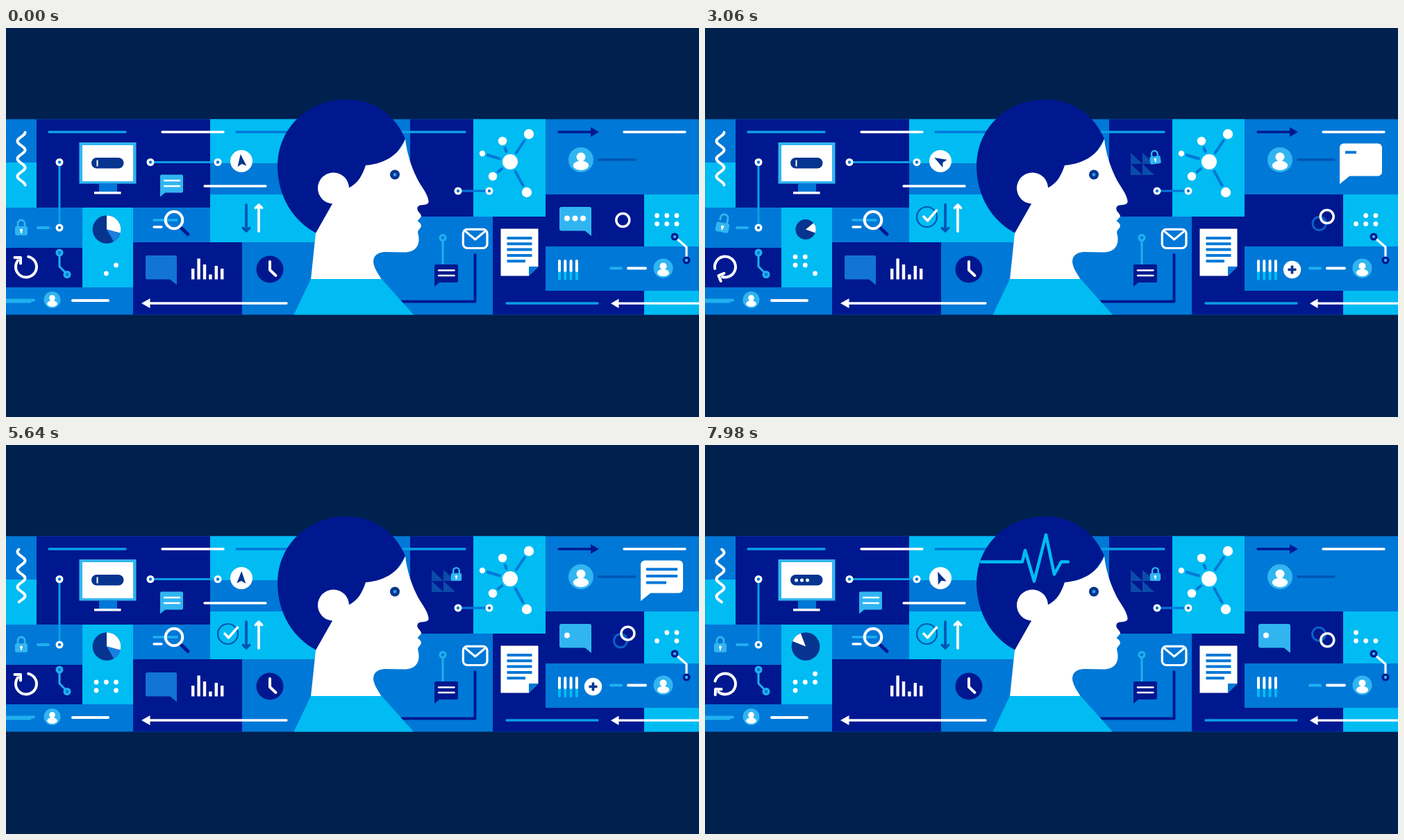
Recreate the animation shown at these times as an HTML page with a canvas. Size 998 by 561 pixels, loop 8 s.

```html
<!DOCTYPE html>
<html lang="en">
<head>
<meta charset="utf-8">
<title>Connected mind</title>
<style>
  html, body { margin: 0; width: 100%; height: 100%; overflow: hidden; background: #00204d; }
  canvas { display: block; }
</style>
</head>
<body>
<canvas id="stage" width="998" height="561"></canvas>
<script>
const ctx = document.getElementById('stage').getContext('2d');
const LOOP = 8000, CYCLE = 3600;
const NIGHT = '#00204d', NAVY = '#00188f', BLUE = '#0078d7', CYAN = '#00bcf2';
const SKY = '#31b5f1', TRACE = '#0a9fe6', AQUA = '#1fb0f0', INK = '#0055b3', DEEP = '#06348f', WHITE = '#fff';

// ---- timing ----
const clamp = u => Math.min(1, Math.max(0, u));
const smooth = u => u * u * (3 - 2 * u);
const ramp = (t, start, length) => smooth(clamp((t - start) / length));
const pulse = (t, center, half) => smooth(clamp(1 - Math.abs(t - center) / half));
const between = (t, start, end, length) => ramp(t, start, length) - ramp(t, end, length);
const noise = (...seed) => {
  const v = Math.sin(seed.reduce((sum, s, i) => sum + s * (12.9898 + i * 65.2432), 1)) * 43758.5453;
  return v - Math.floor(v);
};

// ---- drawing helpers ----
function rect(x1, y1, x2, y2, color, r = 0) {
  ctx.fillStyle = color;
  ctx.beginPath();
  ctx.roundRect(x1, y1, x2 - x1, y2 - y1, r);
  ctx.fill();
}
function dot(x, y, r, color) {
  ctx.fillStyle = color;
  ctx.beginPath();
  ctx.arc(x, y, r, 0, 7);
  ctx.fill();
}
function ring(x, y, r, color, width) {
  ctx.strokeStyle = color;
  ctx.lineWidth = width;
  ctx.beginPath();
  ctx.arc(x, y, r, 0, 7);
  ctx.stroke();
}
function outline(points) {
  ctx.beginPath();
  for (let i = 0; i < points.length; i += 2) ctx.lineTo(points[i], points[i + 1]);
}
function line(color, width, ...points) {
  ctx.strokeStyle = color;
  ctx.lineWidth = width;
  outline(points);
  ctx.stroke();
}
function poly(color, ...points) {
  ctx.fillStyle = color;
  outline(points);
  ctx.fill();
}
function fillPath(color, path) {
  ctx.fillStyle = color;
  ctx.fill(path);
}
// Draws around a pivot; the callback uses stage coordinates.
function posed(x, y, scale, degrees, draw) {
  if (scale <= 0.01) return;
  ctx.save();
  ctx.translate(x, y);
  ctx.rotate(degrees * Math.PI / 180);
  ctx.scale(scale, scale);
  ctx.translate(-x, -y);
  draw();
  ctx.restore();
}
function node(x, y, outer = WHITE, inner = BLUE) {
  dot(x, y, 5.5, outer);
  dot(x, y, 2.2, inner);
}
function person(x, y, r, tilt = 0) {
  dot(x, y, r, SKY);
  posed(x, y, 1, tilt, () => {
    dot(x, y - r * .22, r * .36, WHITE);
    ctx.beginPath();
    ctx.ellipse(x, y + r * .46, r * .62, r * .37, 0, 0, 7);
    ctx.fill();
  });
}
function bubble(x1, y1, x2, y2, tail, color, right = false, r = 2) {
  rect(x1, y1, x2, y2, color, r);
  const x = right ? x2 : x1, inward = right ? -1 : 1;
  poly(color, x, y2 - r - 4, x, y2 + tail, x + inward * tail * 1.3, y2 - .5);
}
function lock(x, y, open) {
  const lift = open * 4;
  ctx.strokeStyle = SKY;
  ctx.lineWidth = 2.8;
  ctx.beginPath();
  ctx.moveTo(x - 5, y - 6 - lift * 1.5);
  ctx.arc(x, y - 10 - lift, 5, Math.PI, 0);
  ctx.lineTo(x + 5, y - 6);
  ctx.stroke();
  rect(x - 9, y - 6, x + 9, y + 7, SKY, 2.5);
  dot(x, y - .5, 2, WHITE);
  rect(x - 1, y, x + 1, y + 4, WHITE);
}
// A field of dots that blinks at random, once per slot of time.
function blinkingDots(x, y, gapX, gapY, rows, slot) {
  for (let i = 0; i < rows * 3; i++)
    if (slot < 0 || noise(slot, i, rows) < .52)
      dot(x + i % 3 * gapX, y + Math.floor(i / 3) * gapY, 3.4, WHITE);
}

// ---- scene ----
function tiles() {
  rect(0, 0, 998, 561, NIGHT);
  rect(0, 131.5, 998, 413.5, BLUE);
  rect(0, 194, 44, 259, CYAN);
  rect(44, 131.5, 294, 259, NAVY);
  rect(294, 131.5, 470, 195, CYAN);
  rect(294, 240, 470, 309, CYAN);
  rect(0, 317, 110, 374, NAVY);
  rect(110, 259, 183, 374, CYAN);
  rect(183, 309, 340, 413.5, NAVY);
  rect(582, 131.5, 673, 272, NAVY);
  rect(673, 131.5, 777, 272, CYAN);
  rect(701, 272, 777, 413.5, NAVY);
  rect(777, 240, 919, 315, NAVY);
  rect(919, 240, 998, 315, CYAN);
  rect(777, 379, 919, 413.5, NAVY);
  rect(919, 379, 998, 413.5, CYAN);
}

function leftStill() {
  line(TRACE, 3.3, 62, 150, 172, 150);
  line(WHITE, 3.3, 225, 150, 313, 150);
  line(BLUE, 3.3, 332, 150, 430, 150);
  line(WHITE, 3.3, 286, 228, 374, 228);
  line(TRACE, 3, 77, 193, 77, 288);
  line(TRACE, 3, 208, 193.5, 305, 193.5);
  line(AQUA, 4, 46, 288, 61, 288);
  node(77, 193.5); node(77, 288); node(208, 193.5); node(305, 193.5);

  // computer
  rect(105.5, 165, 187.5, 224.5, SKY);
  rect(110, 169, 183, 221, WHITE);
  rect(134, 224.5, 160, 236, BLUE);
  rect(127, 236, 165.5, 239.5, WHITE);
  rect(123, 187, 169.5, 202.5, DEEP, 7.7);

  // down and up arrows
  line(INK, 3.8, 346, 255, 346, 292);
  line(INK, 3.8, 341.5, 288.5, 346, 293, 350.5, 288.5);
  line(WHITE, 3.8, 364, 293, 364, 256);
  line(WHITE, 3.8, 359.5, 259.5, 364, 255, 368.5, 259.5);

  // magnifier
  line(AQUA, 3.3, 213, 277, 246, 277);
  line(WHITE, 3.3, 213, 287, 224, 287);
  line(NAVY, 5, 252, 288, 262, 297.5);
  ring(242, 277, 12.3, WHITE, 4);

  line(AQUA, 3, 77, 324, 77, 344, 88, 355);
  node(77, 324, AQUA); node(88, 355.5, AQUA);

  // bar chart and clock
  [15.5, 30, 21.5, 7, 19.5, 15.5].forEach((h, i) =>
    rect(267 + i * 8.4, 362.5 - h, 271.4 + i * 8.4, 362.5, WHITE));
  dot(380, 348, 19.5, NAVY);
  line(WHITE, 4, 380, 337, 380, 349, 388.5, 357);

  line(AQUA, 4, -3, 392.5, 40, 392.5);
  line(AQUA, 3, -3, 395, 35, 395);
  person(66.5, 392, 12);
  line(WHITE, 4, 96, 393, 147, 393);
  line(WHITE, 3.3, 204, 397, 404, 397);
  poly(WHITE, 195, 397, 207.5, 390, 207.5, 404);
}

function wave(m) {
  const shift = clamp(m / 2880) ** 1.3;
  ctx.strokeStyle = WHITE;
  ctx.lineWidth = 4;
  ctx.beginPath();
  for (let y = 0; y <= 76; y++)
    ctx.lineTo(22 + 5.5 * Math.cos(2 * Math.PI * (y / 25.4 - shift)), y + 150.5);
  ctx.stroke();
}

function passwordField(m) {
  const age = m - [2090, 1000, 420, -CYCLE].find(start => start <= m);
  const typed = age < 520 ? Math.min(3, Math.floor(age / 120)) : 0;
  for (let i = 0; i < typed; i++) dot(131.5 + i * 8, 195, 2.5, WHITE);
  if (m < 420 || m > 1900) rect(130.5 + typed * 8, 190.5, 132.5 + typed * 8, 199.5, WHITE);
}

function checkMark(t) {
  const again = 4980;
  ctx.globalAlpha = ramp(t, 1150, 150);
  ring(319.5, 272.5, 14.5, INK, 2.2);
  const hidden = t < again ? 1 - ramp(t, 1230, 150) - ramp(t, 4500, 480) : 1 - ramp(t, again, 150);
  if (Math.abs(hidden) < .99) {
    ctx.setLineDash([30, 200]);
    ctx.lineDashOffset = 30 * hidden;
    line(WHITE, 3.5, 315, 272, 320.5, 278, 333.5, 263);
    ctx.setLineDash([]);
  }
  ctx.globalAlpha = 1;
}

function pieChart(m) {
  const x = 145, y = 290.5, r = 20.3;
  const early = pulse(m, 780, 400), late = pulse(m, 2880, 500);
  const turn = 72 * late - 68 * early, open = 1 - .55 * early - .62 * late;
  const slice = (from, to, color) => {
    const rad = a => (turn + a * open - 90) * Math.PI / 180;
    ctx.fillStyle = color;
    ctx.beginPath();
    ctx.moveTo(x, y);
    ctx.arc(x, y, r, rad(from), rad(to));
    ctx.fill();
  };
  posed(x, y, 1 - .4 * late, 0, () => {
    dot(x, y, r, DEEP);
    slice(0, 105, WHITE);
    if (early + late < .5) slice(105, 150, '#1a7fe0');
  });
}

function leftMoving(t, m) {
  wave(m);
  passwordField(m);
  checkMark(t);
  pieChart(m);

  // small message
  posed(222, 243, 1 - between(m, 2400, 3050, 300), -20 * pulse(m, 365, 280), () => {
    bubble(222, 211.5, 255, 237.5, 6, SKY);
    line(WHITE, 2.4, 228, 220, 250, 220);
    line(WHITE, 2.4, 228, 228, 250, 228);
  });

  // compass
  dot(339, 192, 16, WHITE);
  const heading = 45 - 130 * pulse(m, 420, 740) - 50 * pulse(m, 1860, 800) - 135 * pulse(m, 2880, 600);
  posed(339, 192, 1, heading, () => poly(DEEP, 339, 182, 345.5, 199.5, 339, 196, 332.5, 199.5));

  // padlock
  const open = pulse(m, 2880, 430);
  posed(22 + open * 5, 292 - open * 8, 1 + open * .1, open * 18,
    () => lock(22 + open * 5, 292 - open * 8, open));

  blinkingDots(130, 330, 14.3, 12, 3, Math.floor(t / 420));

  // refresh
  const spin = 360 * (ramp(m, 0, 1150) + ramp(m, 2150, 1450));
  posed(29, 344.5, 1, spin, () => {
    ctx.strokeStyle = WHITE;
    ctx.lineWidth = 4;
    ctx.beginPath();
    ctx.arc(29, 344.5, 15, -1.35, 3.8);
    ctx.stroke();
    line(WHITE, 4, 12.5, 331, 21, 331, 21, 339.5);
  });

  // typing message
  posed(246, 370, 1 - between(m, 450, 880, 220), 0, () => {
    bubble(201, 328, 246, 362.5, 8, '#1274d4', true);
    for (const start of [320, 1140, 2650])
      for (let i = 0; i < 3; i++) {
        const age = m - start;
        if (age >= i * 65 && age < 180 + i * 35) dot(211.8 + i * 11.3, 344.5, 4, WHITE);
      }
  });
}

function rightStill(t) {
  line(TRACE, 3.3, 540, 150, 661, 150);
  line(BLUE, 3, 651, 235, 696, 235);
  node(651, 235); node(696, 235);

  // network
  const hub = [726, 193];
  for (const [x, y, r] of [[753, 153, 7.2], [715, 163, 6.2], [686, 181, 4.2], [701, 214, 6.2], [750, 237, 7.2]]) {
    line(BLUE, 4, ...hub, x, y);
    dot(x, y, r + 2.5, CYAN);
    dot(x, y, r, WHITE);
  }
  dot(...hub, 14, CYAN);
  dot(...hub, 11, WHITE);

  line(NAVY, 3.3, 796, 150, 845, 150);
  poly(NAVY, 854, 150, 842, 143, 842, 157);
  line(WHITE, 3.3, 890, 150, 978, 150);
  line(INK, 3.5, 854, 190, 906, 190);
  person(828, 190, 18, 18 * between(t, 3400, 4900, 550));

  // document
  poly(WHITE, 712.5, 289.5, 766.5, 289.5, 766.5, 344, 753, 357.5, 712.5, 357.5);
  poly(BLUE, 753, 344, 766.5, 344, 753, 357.5);
  for (let i = 0; i < 5; i++) rect(721.5, 301 + i * 8.3, i < 4 ? 757.5 : 748, 305 + i * 8.3, BLUE);

  // envelope
  ctx.strokeStyle = WHITE;
  ctx.lineWidth = 3.2;
  ctx.beginPath();
  ctx.roundRect(658.3, 290.3, 34.7, 27.2, 6);
  ctx.stroke();
  line(WHITE, 3, 662, 293.5, 675.7, 305, 689.5, 293.5);

  line(AQUA, 3, 629, 303, 629, 342);
  node(629, 302.5, AQUA);
  bubble(617, 341, 651, 367, 6, NAVY);
  line(WHITE, 2.4, 623, 349.5, 645.5, 349.5);
  line(WHITE, 2.4, 623, 357, 645.5, 357);
  line(NAVY, 4, 675.5, 327, 675.5, 394.5, 560, 394.5);

  // sliders
  for (let x = 797; x < 824; x += 8.3) {
    line(CYAN, 4, x, 345, x, 362);
    line(WHITE, 4, x, 336, x, 350);
  }
  line(AQUA, 4, 871, 346.5, 886, 346.5);
  line(WHITE, 4, 896, 346.5, 921, 346.5);
  person(946.5, 346.5, 14);
  line(WHITE, 3.2, 963, 301, 980, 316, 980, 335);
  node(963, 301, NAVY, SKY); node(980, 335, NAVY, SKY);

  line(TRACE, 3.3, 721, 397, 852, 397);
  line(WHITE, 3.3, 880, 397.2, 1000, 397.2);
  poly(WHITE, 871, 397.2, 882.5, 390.5, 882.5, 404);
}

function rightMoving(t) {
  // pennants with padlock
  ctx.globalAlpha = ramp(t, 1750, 350);
  for (let i = 0; i < 4; i++) {
    const x = 613 + i % 2 * 17, y = 180 + (i >> 1) * 16;
    poly('#0a4cab', x, y, x, y + 16, x + 17, y + 16);
  }
  ctx.globalAlpha = 1;
  const open = 1 - ramp(t, 2340, 560);
  const tilt = 28 * open - 8 + 8 * ramp(t, 4900, 600);
  posed(648.5 + open * 4, 190 - open * 8, .86 * ramp(t, 1850, 400), tilt,
    () => lock(648.5 + open * 4, 190 - open * 8, open));

  // large message, hinged at its tail
  const swing = -35 * (1 - ramp(t, 1900, 700)) - 27 * pulse(t, 6480, 800);
  posed(914, 225, between(t, 1900, 6650, 500), swing, () => {
    bubble(914, 166.5, 975, 213.5, 11.5, WHITE, false, 6);
    for (let i = 0; i < 3; i++) {
      const width = (i < 2 ? 45 : 29) * ramp(t, 2900 + i * 250, 400);
      if (width > .5) rect(922, 177.3 + i * 9.6, 922 + width, 181.3 + i * 9.6, BLUE);
    }
  });

  // three-dot message
  posed(843, 300, 1 - between(t, 2400, 5200, 400), 28 * between(t, 1800, 4000, 1000), () => {
    bubble(797, 258, 843, 292.5, 7.5, SKY, true, 3);
    const start = [7780, 5400, -LOOP].find(s => s <= t);
    const count = Math.min(3, Math.floor((t - start) / 180));
    for (let i = 0; i < count; i++) dot(808 + i * 11.5, 274.5, 4, WHITE);
  });

  // linked rings
  const apart = 7.5 * ramp(t, 1700, 450);
  const angle = (60 - 120 * ramp(t, 1700, 1800) + 95 * ramp(t, 5100, 2200)) * Math.PI / 180;
  const dx = apart * Math.cos(angle), dy = apart * Math.sin(angle), cx = 888.3 + apart * .25;
  if (apart > 0) ring(cx - dx, 277 - dy, 9.5, '#0a62c8', 3);
  ring(cx + dx, 277 + dy, 9.5, WHITE, 3.5);

  blinkingDots(937.5, 270.5, 14.2, 12, 2, t < 1900 ? -1 : Math.floor(t / 900));

  // plus button
  const size = between(t, 2050, 6800, 400) + .28 * pulse(t, 6480, 450);
  posed(845.5, 348.5, size, 0, () => {
    dot(845.5, 348.5, 12.7, WHITE);
    posed(845.5, 348.5, ramp(t, 2450, 300), 0, () => {
      rect(839.5, 346.7, 851.5, 350.3, DEEP);
      rect(843.7, 342.5, 847.3, 354.5, DEEP);
    });
  });
}

const HAIR = new Path2D('M575 160C560 125 530 103 490 103C434 103 391 145 391 199C391 243 414 279 447 296L520 250Z');
const FACE = new Path2D('M575 160C577 179 583 198 591 215C597 228 607 238 608.5 249C609.5 254 605 255 597 255.5' +
  'C592 256 591 261 594 265C597 268 598 270 598 272L592.5 278.5C596 280 598 283 598 286' +
  'C596 291 592 291 593.5 297C597 311 592 322 576 323.5L547 323C532 323 527 332 530 342' +
  'C532 350 538 357 541 363L439 363L446 296L472 250L493 231C508 224 514 210 518 198C548 196 568 180 575 160Z');
const SHOULDERS = new Path2D('M439 362H541L587 413.5H414.5Z');
const PULSE = new Path2D('M395 168.5H457L461 152L474 196.5L491 129.5L503 186.5L513 168.5H557');

function head(m) {
  fillPath(NAVY, HAIR);
  fillPath(WHITE, FACE);
  fillPath(CYAN, SHOULDERS);
  dot(471.5, 231, 22.5, WHITE);
  dot(560, 211.5, 7, DEEP);
  dot(560, 211.5, 2.4, '#2f9be6');

  // heartbeat: a dash that rushes in, lingers and rushes out
  const length = 280, front = 297 + 297 * ((m - 1020) / 663) ** 3;
  if (front > 0 && front < 597) {
    ctx.strokeStyle = CYAN;
    ctx.lineWidth = 4.5;
    ctx.setLineDash([length, 2000]);
    ctx.lineDashOffset = length - front;
    ctx.stroke(PULSE);
    ctx.setLineDash([]);
  }
}

function render(now) {
  const t = now % LOOP, m = t % CYCLE;
  ctx.lineCap = ctx.lineJoin = 'round';
  tiles();
  leftStill();
  leftMoving(t, m);
  rightStill(t);
  rightMoving(t);
  head(m);
  requestAnimationFrame(render);
}
requestAnimationFrame(render);
</script>
</body>
</html>
```
